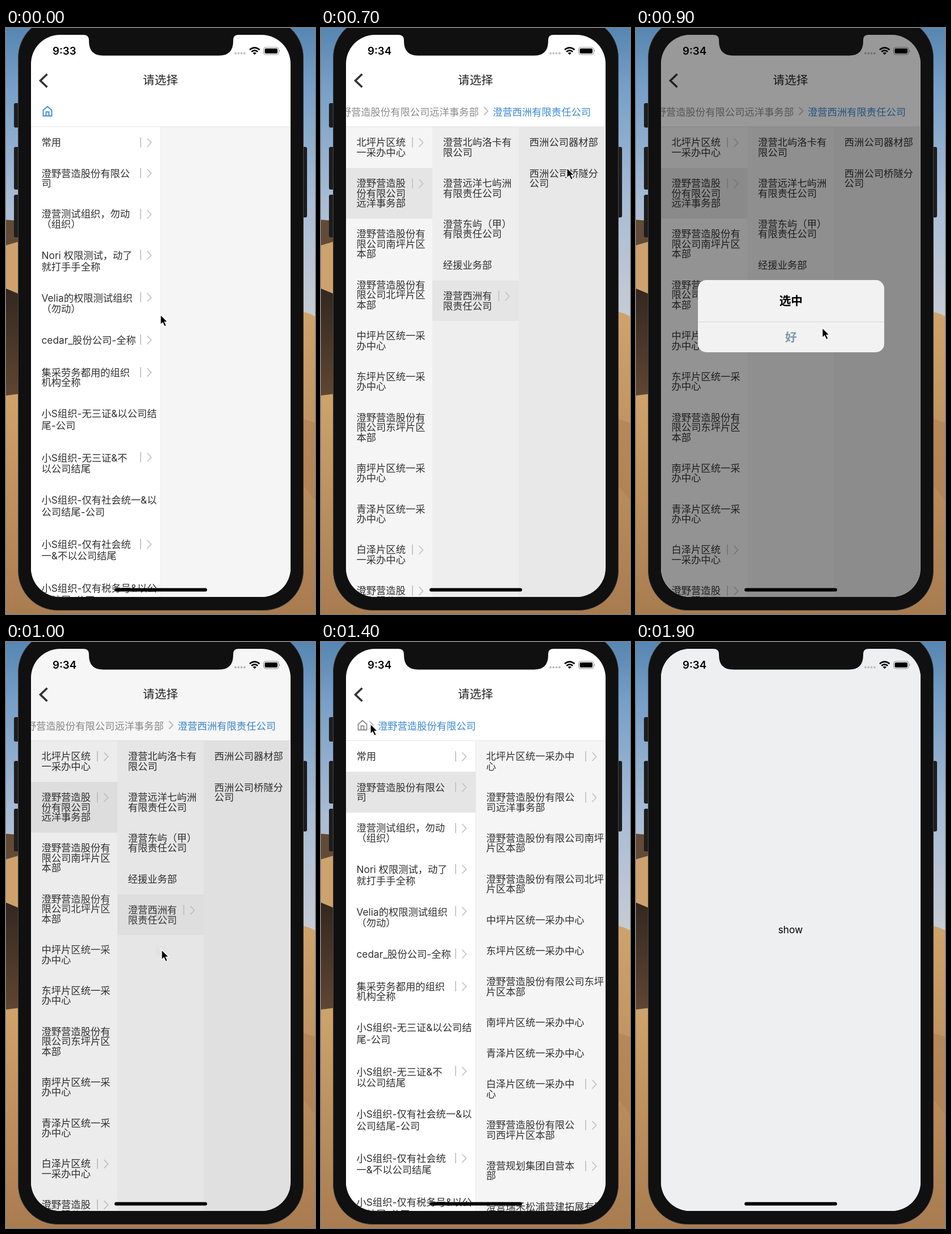
Recreate the animation shown at these times as an HTML page. Size 544x1030 px, loop 2 s.

```html
<!DOCTYPE html>
<html lang="zh-CN">
<head>
<meta charset="utf-8">
<title>组织选择</title>
<style>
html, body { margin: 0; width: 100%; height: 100%; overflow: hidden; }
body { position: relative; font: 17.3px Inter, "Noto Sans CJK SC", "Noto Sans CJK", sans-serif; color: #303030; }
svg, div { position: absolute; }
.backdrop, .chrome, .page, .dim { left: 0; top: 0; width: 544px; height: 1030px; }
.body { left: 20.5px; top: -18px; width: 501px; height: 1039.5px; border: 1px solid #484848; border-radius: 70px; background: #101010; }
.key { width: 9px; background: #1d1d1d; border-radius: 3px; }
.screen { left: 44px; top: 12px; width: 456.5px; height: 988px; border-radius: 51px; overflow: hidden; background: #fff; }
.page { left: -44px; top: -12px; }
.label { line-height: 0; white-space: pre; }
.center { left: 0; width: 544px; text-align: center; }
.heading { font-size: 20.6px; font-weight: 500; color: #222; }
.time { left: 82px; top: 40px; font-size: 18.6px; font-weight: 600; color: #000; }
.crumbs { display: flex; align-items: center; top: 134px; height: 24px; white-space: nowrap; color: #8c8c8c; }
.crumbs > * { position: static; flex: none; }
.crumbs .home { margin-right: -6.5px; }
.crumbs .current { color: #3a89d2; }
.column { top: 174px; height: 830px; overflow: hidden; }
.row { position: relative; padding: 18.4px 0 18.4px 18.5px; white-space: pre; }
.row.selected { background: #e5e5e5; }
.line { position: relative; line-height: 17.5px; }
.line.mixed { line-height: 20.35px; }
.row svg { right: 14px; top: 17px; }
.rule { left: 44px; top: 173px; width: 457px; height: 1px; background: #e4e4e4; }
.split { left: 272px; top: 174px; width: 1px; height: 830px; background: #e9e9e9; }
.dim { background: #000; }
.alert { left: 108.5px; top: 443px; width: 328.5px; height: 127px; border-radius: 15px; background: #f2f2f2; }
.alert div { left: 0; width: 100%; text-align: center; font-size: 20.6px; font-weight: 600; color: #000; }
.alert .bar { top: 73px; height: 1px; background: #d6d6d6; }
.alert .ok { color: #7e99a8; }
.show { background: #eeeff1; color: #000; }
</style>
</head>
<body>
<svg class="backdrop" viewBox="0 0 544 1030">
  <defs>
    <linearGradient id="sky" x2="0" y2="1">
      <stop offset="0" stop-color="#5686b1"/><stop offset=".1" stop-color="#769fc8"/>
      <stop offset=".3" stop-color="#a9bdd6"/><stop offset=".5" stop-color="#c8ccd3"/>
    </linearGradient>
    <linearGradient id="sand" x2="0" y2="1">
      <stop offset="0" stop-color="#cfa36b"/><stop offset="1" stop-color="#a97c50"/>
    </linearGradient>
    <linearGradient id="shade" x2="0" y2="1">
      <stop offset="0" stop-color="#33271f"/><stop offset="1" stop-color="#614632"/>
    </linearGradient>
  </defs>
  <rect width="544" height="1030" fill="url(#sky)"/>
  <path d="M0 337L24 339V1030H0Z" fill="#634a36"/>
  <path d="M0 382L24 375V470H0Z" fill="#cda26d"/>
  <path d="M0 458L24 468V650H0Z" fill="url(#shade)"/>
  <path d="M0 646L24 643 300 700V1030H0Z" fill="url(#sand)"/>
  <path d="M300 700L520 498Q534 501 544 507V1030H300Z" fill="url(#sand)"/>
  <path d="M520 686L544 694V830L520 800Z" fill="#ad7c4e" opacity=".5"/>
</svg>
<div class="key" style="left:14px;top:132px;height:43px"></div>
<div class="key" style="left:14px;top:209px;height:75px"></div>
<div class="key" style="left:14px;top:293px;height:75px"></div>
<div class="key" style="left:521px;top:209px;height:124px"></div>
<div class="body"></div>
<div class="screen"><div class="page" id="page"></div></div>
<svg class="chrome" viewBox="0 0 544 1030">
  <path d="M136 11V12Q146 12 146 21V23Q146 48.5 171 48.5H375Q400 48.5 400 23V21Q400 12 409 12V11Z" fill="#101010"/>
  <rect x="191" y="984.5" width="163" height="6" rx="3"/>
  <path id="cursor" d="M0 0V17.5L4 13.8 7 20.5 10.3 19 7.3 12.5H12.5Z" stroke="#fff" stroke-width="1.2"/>
</svg>
<script>
const COMPANY = "澄野营造股份有限公司";
const DIVISION = COMPANY + "远洋事务部";
const BRANCH = "澄营西洲有限责任公司";
const center = area => area + "片区统一采办中心";
const office = area => COMPANY + area + "片区本部";

// A trailing ">" marks a row that can be opened.
const LISTS = [
  ["常用>", COMPANY + ">", "澄营测试组织，勿动（组织）>", "Nori 权限测试，动了就打手手全称>",
    "Velia的权限测试组织（勿动）>", "cedar_股份公司-全称>", "集采劳务都用的组织机构全称>",
    "小S组织-无三证&以公司结尾-公司", "小S组织-无三证&不以公司结尾>",
    "小S组织-仅有社会统一&以公司结尾-公司", "小S组织-仅有社会统一&不以公司结尾>",
    "小S组织-仅有税务号&以公司结尾-公司"],
  [center("北坪") + ">", DIVISION + ">", office("南坪"), office("北坪"), center("中坪"), center("东坪"),
    office("东坪"), center("南坪"), center("青泽"), center("白泽") + ">", office("西坪") + ">",
    "澄营规划集团自营本部>", "澄营瑞禾松浦营建拓展有限公司"],
  ["澄营北屿洛卡有限公司", "澄营远洋七屿洲有限责任公司", "澄营东屿（甲）有限责任公司", "经援业务部", BRANCH + ">"],
  ["西洲公司器材部", "西洲公司桥隧分公司"]
];
const SELECTED = [1, 1, 4];
const SHADES = ["#fff", "#f5f5f5", "#eeeeee", "#e8e8e8"];
const PATH = [COMPANY, DIVISION, BRANCH];
const CLOSED = -1;

// One entry per 100 ms: open depth, pointer position and dialog strength.
const STEPS = [
  { level: 0, at: [272, 504] }, { level: 0, at: [205, 290] },
  { level: 1, at: [205, 262] }, { level: 1, at: [365, 284] },
  { level: 2, at: [483, 268] }, { level: 2, at: [468, 400] }, { level: 2, at: [440, 474] },
  { level: 3, at: [433, 246] }, { level: 3, at: [433, 258] },
  { level: 3, at: [328, 527], dim: .4, alert: 1 }, { level: 3, at: [274, 541], dim: .035, alert: .05 },
  { level: 3, at: [230, 340] }, { level: 3, at: [170, 148] },
  { level: 2, at: [130, 146] },
  { level: 1, at: [87, 144] },
  { level: 0, at: [74, 142] }, { level: 0, at: [66, 92] },
  { level: CLOSED, at: [64, 100] }, { level: CLOSED }, { level: CLOSED }
];

const charWidth = c => /[S&-]/.test(c) ? .6 : c < "\x7f" ? .5 : 1;

function wrap(text, limit) {
  const lines = [""];
  let used = 0;
  for (const c of text) {
    const last = lines.length - 1;
    if (used + charWidth(c) > limit) {
      // An opening bracket never ends a line.
      const carry = lines[last].endsWith("（") ? "（" : "";
      if (carry) lines[last] = lines[last].slice(0, -1);
      lines.push(carry + c);
      used = carry.length + charWidth(c);
    } else {
      lines[last] += c;
      used += charWidth(c);
    }
  }
  return lines;
}

const escapeText = text => text.replace(/&/g, "&amp;");
const label = (cls, y, text) => `<div class="label ${cls}" style="top:${y}px">${text}</div>`;

const rowArrow = `<svg width="24" height="20" fill="none" stroke="#c4c4c4" stroke-width="1.8">
  <path d="M3 1V19M14.5 3L21.5 10.5 14.5 18"/></svg>`;
const crumbArrow = `<svg width="24.5" height="20" fill="none" stroke="#bdbdbd" stroke-width="1.8">
  <path d="M9 3L16 10 9 17"/></svg>`;
const homeIcon = color => `<svg class="home" width="18" height="20" fill="none" stroke="${color}" stroke-width="1.8">
  <path d="M1.5 8.5L9 2 16.5 8.5V18.5H1.5ZM6.5 18V11.5H11.5V18"/></svg>`;

function row(item, wide, selected) {
  const opens = item.endsWith(">");
  const limit = wide ? (opens ? 9.65 : 12.3) : (opens ? 5.3 : 7.3);
  const lines = wrap(opens ? item.slice(0, -1) : item, limit).map(text =>
    `<div class="line${/[\w&-]/.test(text) ? " mixed" : ""}">${escapeText(text)}</div>`);
  return `<div class="row${selected ? " selected" : ""}">${lines.join("")}${opens ? rowArrow : ""}</div>`;
}

function columns(level) {
  const wide = level < 2;
  const width = 456.5 / (wide ? 2 : 3);
  const first = Math.max(0, level - 2);
  let html = "";
  for (let depth = first; depth <= Math.max(1, level); depth++) {
    const rows = depth > level ? [] : LISTS[depth].map((item, i) =>
      row(item, wide, depth < level && i === SELECTED[depth]));
    html += `<div class="column" style="left:${44 + (depth - first) * width}px;width:${width}px;background:${SHADES[depth]}">${rows.join("")}</div>`;
  }
  return html + (wide ? '<div class="split"></div>' : "");
}

function crumbs(level) {
  const place = level < 2 ? "left:64px" : "right:69px";
  const names = PATH.slice(0, level).map((name, i) =>
    `${crumbArrow}<span class="${i === level - 1 ? "current" : ""}">${name}</span>`);
  return `<div class="crumbs" style="${place}">${homeIcon(level ? "#8c8c8c" : "#3a89d2")}${names.join("")}</div>`;
}

function statusBar(time) {
  const dots = [404, 409.3, 414.6, 419.9].map(x => `<circle cx="${x}" cy="44.5" r="1.9" fill="#bdbdbd"/>`);
  return label("time", 40, time) + `<svg class="chrome" viewBox="0 0 544 1030">${dots.join("")}
    <g fill="none" stroke="#000" stroke-width="2.7">
      <path d="M429 38.3Q437.7 31 446.4 38.3M432.2 41.8Q437.7 37 443.2 41.8"/></g>
    <path d="M434.6 43.9Q437.7 41.4 440.8 43.9L437.7 47Z"/>
    <rect x="453.5" y="34" width="26.5" height="12.8" rx="3.8" fill="none" stroke="#8a8a8a"/>
    <rect x="455.5" y="36" width="22.5" height="8.8" rx="2"/>
    <path d="M481.3 38.3Q483.4 40.4 481.3 42.5Z" fill="#8a8a8a"/></svg>`;
}

function picker(level) {
  return columns(level) + crumbs(level) + '<div class="rule"></div>' +
    label("center heading", 92, "请选择") +
    `<svg class="chrome" viewBox="0 0 544 1030"><path d="M72.5 81L60.5 92.5 72.5 104" fill="none" stroke="#333" stroke-width="3.6"/></svg>`;
}

function dialog({ dim, alert }) {
  if (!dim) return "";
  return `<div class="dim" style="opacity:${dim}"></div><div class="alert" style="opacity:${alert}">
    ${label("", 37, "选中")}<div class="bar"></div>${label("ok", 101, "好")}</div>`;
}

const page = document.getElementById("page");
const cursor = document.getElementById("cursor");
let shown = -1;

function draw() {
  const index = Math.floor(performance.now() % 2000 / 100);
  if (index !== shown) {
    shown = index;
    const step = STEPS[index];
    const closed = step.level === CLOSED;
    page.className = closed ? "page show" : "page";
    page.innerHTML = (closed ? label("center", 506, "show") : picker(step.level)) +
      statusBar(index < 2 ? "9:33" : "9:34") + dialog(step);
    cursor.setAttribute("visibility", step.at ? "visible" : "hidden");
    if (step.at) cursor.setAttribute("transform", `translate(${step.at})`);
  }
  requestAnimationFrame(draw);
}
draw();
</script>
</body>
</html>
```
